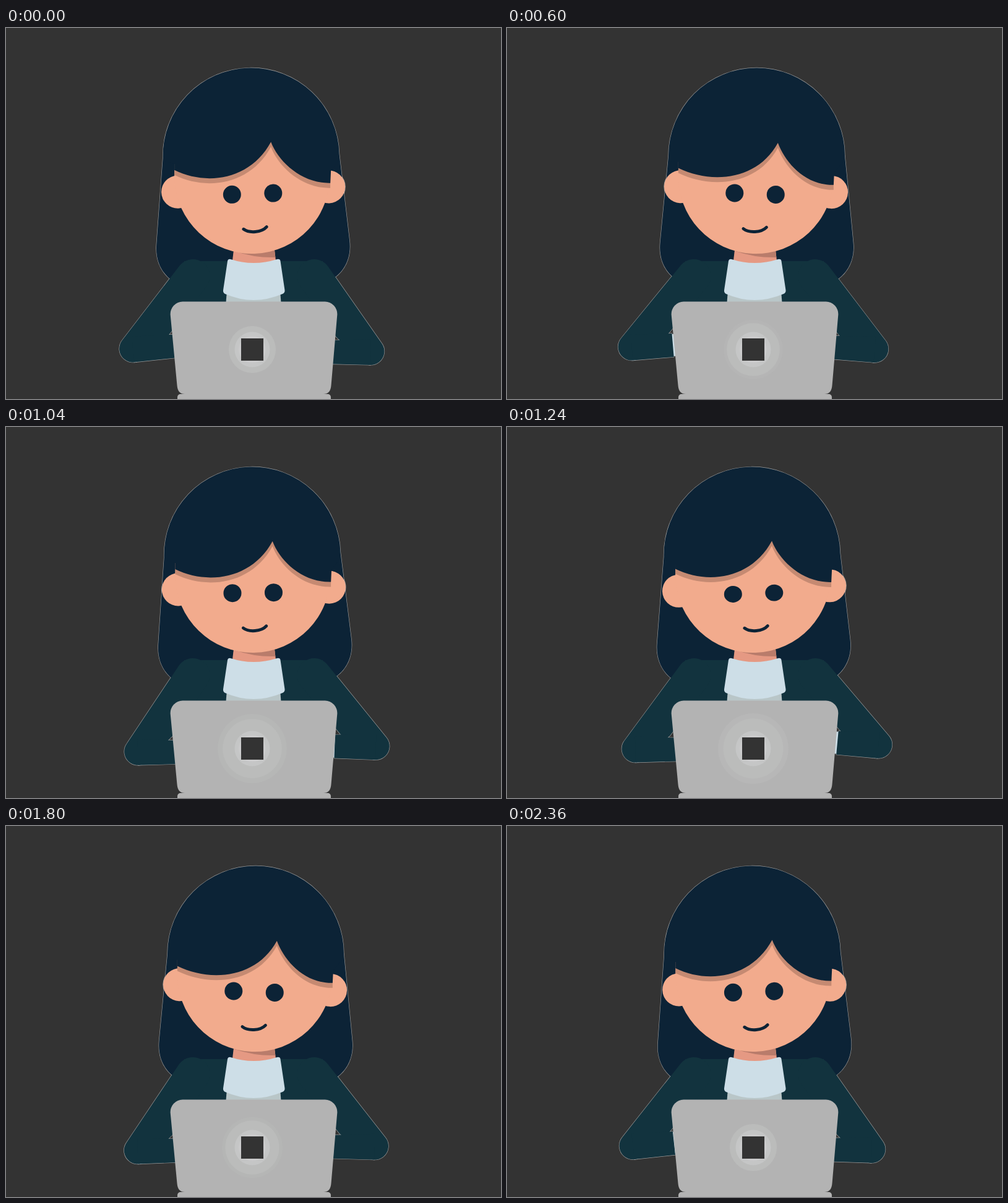
These frames come from a looping animation (800x600 px, 2400 ms). An HTML page:

```html
<!DOCTYPE html>
<html lang="en">
<head>
<meta charset="utf-8">
<title>Working at the laptop</title>
<style>
  html, body { margin: 0; width: 100%; height: 100%; overflow: hidden; background: #333; }
  svg { display: block; width: 100vw; height: 100vh; }
  .hair { fill: #0c2336; }
  .skin { fill: #f2ab8d; }
  .coat { fill: #12333e; }
  .linen { fill: #cddee7; }
  .metal { fill: #b3b3b3; }
  .rim { stroke: #fff; stroke-opacity: .5; stroke-width: 1.3; }
</style>
</head>
<body>
<svg viewBox="0 0 800 600">
  <defs>
    <path id="upper" d="M-27.5,0A27.5,27.5 0 0 1 27.5,0L30.5,100L22,152A22,22 0 0 1 -22,152Z"/>
    <path id="fore" d="M0,22L66.500,22L66.500,-16L0,-20Z"/>
    <path id="cuff" d="M64,21H86V-15H64Z"/>
    <path id="mane" d="M-142.5,0A142.5,142.5 0 0 1 142.5,0L156,140C159,170 145,190 130,200H-130C-145,190 -159,170 -156,140Z"/>
    <g id="ears">
      <circle cx="279" cy="261" r="26.6"/>
      <circle cx="523" cy="261" r="26.6"/>
    </g>
    <g id="armL"><use class="up" href="#upper"/><use class="lo" href="#fore"/></g>
    <g id="armR" transform="translate(800) scale(-1 1)"><use class="up" href="#upper"/><use class="lo" href="#fore"/></g>
  </defs>

  <rect width="800" height="600" fill="#333"/>

  <g class="rim" fill="none">
    <use href="#ears" class="tilt"/>
    <use href="#mane" class="sway"/>
    <use href="#armL"/>
    <use href="#armR"/>
  </g>

  <use href="#mane" class="sway hair"/>

  <g class="linen">
    <use id="cuffL" href="#cuff"/>
    <g transform="translate(800) scale(-1 1)"><use id="cuffR" href="#cuff"/></g>
  </g>
  <g class="coat">
    <path d="M288,377H512V470H288Z"/>
    <use href="#armL"/>
    <use href="#armR"/>
  </g>

  <path d="M369,350L366,376Q400,386 436,376L433,350Z" fill="#e59983"/>
  <path d="M369,350L369.500,361Q402,372 435.300,371L433,350Z" fill="#b97c6b"/>
  <path d="M357,425H443L445,450H355Z" fill="#b9c6c8"/>
  <path class="linen" d="M363,374Q400,386 438,374Q443,373 443.500,377L450.500,424Q451,428 447,430Q400,450 354,430Q350.500,428 351,424L358,377Q359,373 363,374Z"/>

  <g class="tilt">
    <g class="skin">
      <use href="#ears"/>
      <circle cx="399.800" cy="239.500" r="125.500"/>
    </g>
    <ellipse class="eye hair" cx="366.500" rx="14.500"/>
    <ellipse class="eye hair" cx="433" rx="14.500"/>
  </g>
  <path id="mouth" d="M383,325C392,332 412,331 420.300,322" fill="none" stroke="#0c2336" stroke-width="5" stroke-linecap="round"/>
  <path id="shade" fill="#c58a72" transform="translate(0 8)"/>
  <path id="bangs" class="hair"/>

  <g class="metal">
    <rect x="277" y="592" width="248" height="20" rx="5"/>
    <path d="M285.500,442.500H515.500A20,20 0 0 1 535.300,464L525.500,578Q524.500,592 513,592H289Q277.500,592 276.500,578L265.700,464A20,20 0 0 1 285.500,442.500Z"/>
  </g>
  <g transform="translate(398 520)">
    <circle id="haze" fill="#bbbcbb"/>
    <circle id="halo" fill="#bbbcbb"/>
    <circle r="28.500" fill="#c5c6c6"/>
    <circle r="22" fill="#cbcbcc"/>
    <rect x="-18" y="-18" width="36" height="36" fill="#333"/>
  </g>
</svg>
<script>
  const LOOP = 2400, STEP = 40;
  const $ = id => document.getElementById(id);
  const all = sel => document.querySelectorAll(sel);
  const set = (el, name, value) => el.setAttribute(name, value);
  const ease = (t, a, b) => {
    const p = Math.min(1, Math.max(0, (t - a) / (b - a)));
    return p * p * (3 - 2 * p);
  };
  const wave = (t, peak, period) => Math.cos(2 * Math.PI * (t - peak) / period);
  const deg = rad => rad * 180 / Math.PI;

  function poseArm(arm, cuff, x, slope) {
    const dx = 302 - x, y = 401.5 + Math.sqrt(152 * 152 - dx * dx);
    const lower = `translate(${x} ${y}) rotate(${deg(Math.atan(slope))})`;
    set(arm.querySelector('.up'), 'transform', `translate(302 401.5) rotate(${deg(Math.asin(dx / 152))})`);
    set(arm.querySelector('.lo'), 'transform', lower);
    set(cuff, 'transform', lower);
  }

  function poseHair(t, lean) {
    const x = 396 + 7.5 * lean, off = x - 399.8;
    const tail = 401.5 - 3.7 * wave(t, 185, 1200);
    const turn = -deg((tail - x) / 150);
    all('.sway').forEach(el => set(el, 'transform', `translate(${x} 207) rotate(${turn})`));

    const roll = .9 * wave(t, 490, 1200);
    const lx = 274.5 + off * .65, ly = 228.2 - roll * 2.2;
    const px = 433 + off * 1.3, py = 185 + off * .2;
    const rx = 526 + off * .5, ry = 252.2 + roll * 2;
    const edge = `M${lx},${ly}C${lx + 53},${ly + 26} ${px - 33},${py + 61} ${px},${py}` +
      `C${px + 12},${py + 32} ${rx - 46},${ry + 1} ${rx},${ry}`;
    set($('shade'), 'd', `${edge}V150H${lx}Z`);
    set($('bangs'), 'd', `${edge}L${rx + 1},${ry - 20}L${x + 141},215V207` +
      `A141,141 0 0 0 ${x - 141},207V215L${lx},${ly - 10}Z`);
  }

  function poseFace(t, lean) {
    const tilt = -2 + 4.1 * lean;
    all('.tilt').forEach(el => set(el, 'transform', `rotate(${tilt} 400 303)`));
    set($('mouth'), 'transform', `translate(${1 - 2 * lean} 0) rotate(${tilt * .5} 401 325)`);
    const open = 1 - .9 * (ease(t, 1215, 1360) - ease(t, 1360, 1520));
    all('.eye').forEach(el => {
      set(el, 'ry', 14.5 * open);
      set(el, 'cy', 268.2 + 14.5 * (1 - open));
    });
  }

  function draw(now) {
    const t = Math.floor(now % LOOP / STEP) * STEP;
    const h = (t + 1160) % 1200;
    const lean = ease(h, 0, 560) - ease(h, 620, 1200);
    poseHair(t, lean);
    poseFace(t, lean);
    poseArm($('armL'), $('cuffL'), 207.2 - 6 * wave(t, 645, 800), -.063 + .048 * wave(t, 340, 800));
    poseArm($('armR'), $('cuffR'), 204.8 + 5.8 * wave(t, -18, 800), -.055 + .04 * wave(t, 90, 800));

    const glow = (1 - wave(t, 30, LOOP)) / 2;
    set($('halo'), 'r', 38 + 10.5 * glow);
    set($('haze'), 'r', 40 + 17 * glow);
    set($('haze'), 'opacity', .4 * glow);
  }

  const start = performance.now();
  function tick() {
    draw(performance.now() - start);
    requestAnimationFrame(tick);
  }
  tick();
</script>
</body>
</html>
```
